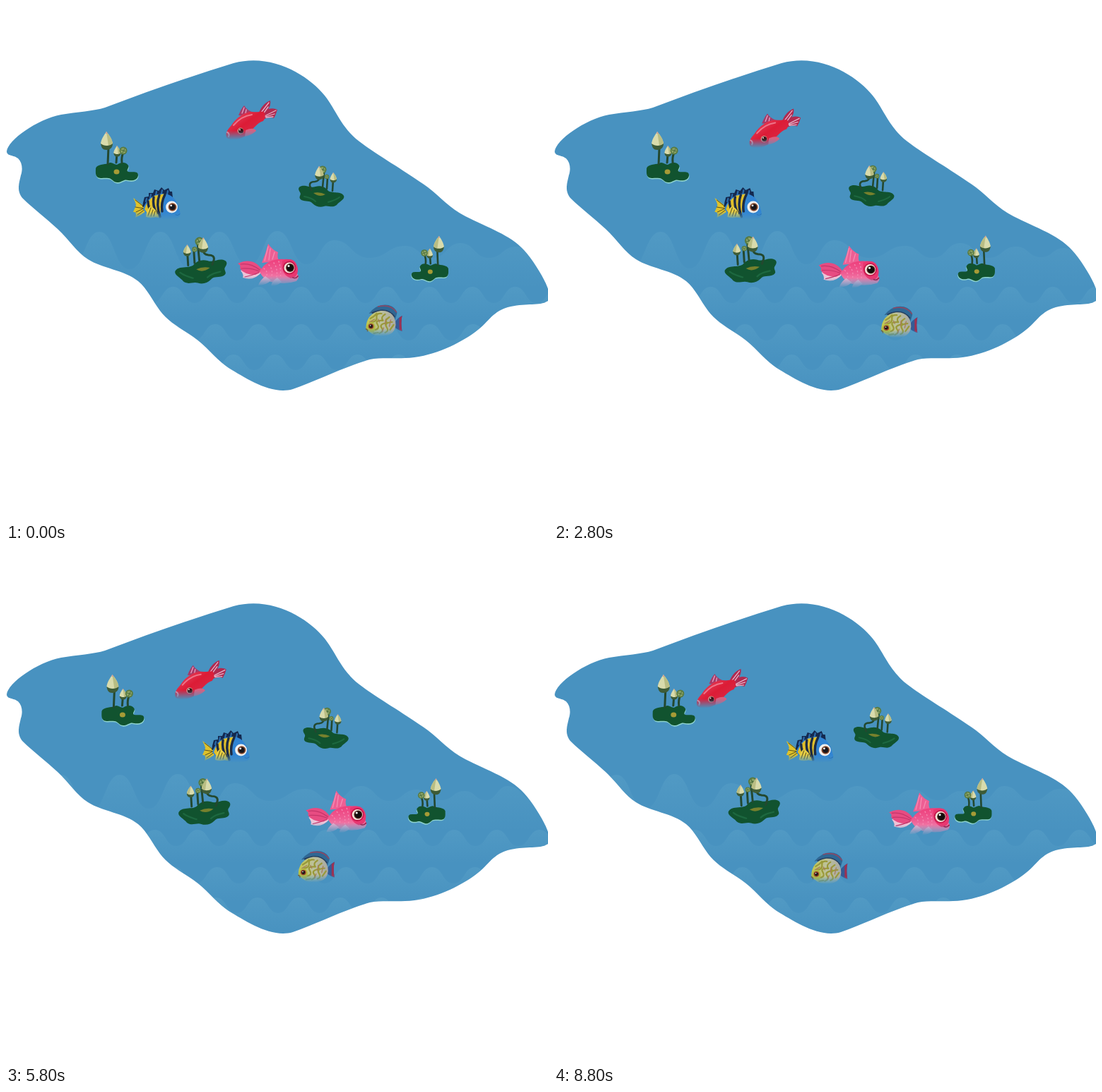
These frames come from a looping animation (767x730 px, 9 s). An HTML page:

```html
<!DOCTYPE html>
<html lang="en">
<head>
<meta charset="utf-8">
<title>Fish pond</title>
<style>
html, body { margin: 0; width: 100%; height: 100%; overflow: hidden; background: #fff; }
svg { display: block; width: 767px; height: 730px; }
.line { fill: none; stroke-linecap: round; stroke-linejoin: round; }
</style>
</head>
<body>
<svg viewBox="0 0 767 730">
<defs>
  <clipPath id="shore"><path id="pond" d="M1 206C3 190 43 161 78 154C100 150 125 149 140 144C200 121 260 100 322 81C376 66 428 98 451 127C467 147 474 172 500 192C523 210 567 235 597 257C614 270 628 287 650 298C683 315 713 324 733 346C746 360 763 388 767 401V418C755 426 735 420 710 427C685 435 684 449 660 465C635 482 600 498 565 499C550 500 530 498 515 501C480 511 440 531 406 543C376 552 340 528 315 513C297 501 284 482 265 469C247 457 229 447 218 432C207 417 200 401 187 390C167 374 136 372 116 359C100 349 90 332 73 316C57 301 37 286 24 273C14 262 19 250 21 240C24 231 23 222 17 216C11 211 1 213 1 206Z"/></clipPath>
  <linearGradient id="sink" x2="0" y2="1">
    <stop offset=".78" stop-color="#fff"/><stop offset="1" stop-color="#000"/>
  </linearGradient>
  <mask id="dip" maskContentUnits="objectBoundingBox"><rect x="-.1" y="-.1" width="1.2" height="1.1" fill="url(#sink)"/></mask>
  <linearGradient id="redSkin" x2="1" y2="1">
    <stop stop-color="#e8506e"/><stop offset=".45" stop-color="#dc1c36"/><stop offset="1" stop-color="#d9304f"/>
  </linearGradient>
  <linearGradient id="pinkSkin" x2="0" y2="1">
    <stop stop-color="#ee3f7c"/><stop offset=".5" stop-color="#ee5c93"/><stop offset="1" stop-color="#f396bb"/>
  </linearGradient>
  <linearGradient id="discusSkin">
    <stop stop-color="#c3c84a"/><stop offset=".5" stop-color="#bcc19c"/><stop offset="1" stop-color="#a9a9a4"/>
  </linearGradient>

  <g id="bud">
    <path d="M-8 17C-7 10-3 5 0 0C4 5 8 10 9 17C6 24-5 24-8 17Z" fill="#d9dbac"/>
    <path d="M0 0C4 5 8 10 9 17L3 20Z" fill="#b9bd83"/>
    <path d="M-1 3L0 0L2 3Z" fill="#d59a92"/>
    <path d="M-8 17C-3 21 4 21 9 17C9 23 5 26 0 26S-7 23-8 17Z" fill="#3d5b37"/>
  </g>
  <g id="pod">
    <circle r="5.5" fill="#56793f"/><circle r="3.8" fill="#8ba367"/>
    <path class="line" d="M-3-1L3 1M-1 3L2-3" stroke="#486b39"/>
  </g>

  <g id="tallLotus">
    <path id="tallPad" d="M0 52C2 46 12 47 18 45C22 42 26 47 30 47C36 43 43 43 46 48C48 51 42 55 46 57C52 58 60 55 60 62C59 69 52 70 46 69C40 67 38 71 32 72C25 73 23 66 18 66C12 65 8 67 3 65C-1 62 0 57 0 52Z" fill="#8ed3cf" transform="translate(.5 1.6)"/>
    <use href="#tallPad" transform="translate(-.5 -1.6)" style="filter:brightness(0)" opacity="0"/>
    <path d="M0 52C2 46 12 47 18 45C22 42 26 47 30 47C36 43 43 43 46 48C48 51 42 55 46 57C52 58 60 55 60 62C59 69 52 70 46 69C40 67 38 71 32 72C25 73 23 66 18 66C12 65 8 67 3 65C-1 62 0 57 0 52Z" fill="#11532f"/>
    <ellipse cx="29.5" cy="57" rx="4" ry="3.5" fill="#a69b36"/>
    <path class="line" d="M18 23L17 46M30 31L29 44M39 30Q36 36 37 44" stroke="#23482f" stroke-width="3"/>
    <use href="#bud" transform="translate(15 0)"/>
    <use href="#bud" transform="translate(30 20) scale(.6)"/>
    <use href="#pod" transform="translate(39 27)"/>
  </g>
  <g id="curlLotus">
    <path d="M2 30C10 26 16 33 24 30C32 28 38 31 42 36C48 40 60 36 64 43C66 48 58 51 54 56C48 61 42 56 36 58C30 60 24 58 20 54C16 49 10 52 4 49C-2 45 5 42 2 38C0 35-1 32 2 30Z" fill="#11532f"/>
    <path d="M8 44C16 46 20 47 24 51M42 52C48 50 53 49 58 45" class="line" stroke="#1d6840" stroke-width="2"/>
    <path d="M21 39Q30 46 38 41Q30 37 21 39Z" fill="#77812d"/>
    <path class="line" d="M29 16Q30 22 23 23Q15 23 16 29L18 35M36 10L34 31M41 17L40 33M49 20L48 36" stroke="#23482f" stroke-width="2.6"/>
    <use href="#pod" transform="translate(34 6)"/>
    <use href="#pod" transform="translate(40 16) scale(.6)"/>
    <use href="#bud" transform="translate(29 1) scale(.74)"/>
    <use href="#bud" transform="translate(49 10) scale(.56)"/>
  </g>

  <g id="redFish" mask="url(#dip)">
    <path d="M46 20C49 10 55 3 63 0Q64 7 60 12Q68 10 73 13Q71 20 68 25C60 22 54 27 46 30Z" fill="#b02a50"/>
    <path class="line" d="M50 17L61 3M52 20L60 9M55 22L71 14M56 23L69 19M57 24L67 23" stroke="#e5b2c8" stroke-width="1.3"/>
    <path d="M18 21Q22 11 26 7Q29 13 39 17L36 22Z" fill="#a63a68"/>
    <path class="line" d="M23 18L26 10M28 18L29 13" stroke="#e8a0c0" stroke-width="1.3"/>
    <path d="M1 52C-1 45 3 41 8 35C15 24 26 16 38 16C46 17 49 15 54 16Q58 22 53 29C44 32 39 40 31 48C22 55 6 59 1 52Z" fill="url(#redSkin)"/>
    <path class="line" d="M11 35Q22 22 37 20" stroke="#ee7489" stroke-width="2"/>
    <path d="M28 42Q40 37 43 43Q37 49 27 51Z" fill="#d9607f"/>
    <path class="line" d="M2 45Q6 47 4 51" stroke="#f08a9f" stroke-width="2"/>
    <circle cx="21" cy="43" r="4.4" fill="#d99a8e"/><circle cx="21.5" cy="43" r="3.5" fill="#391417"/>
    <circle cx="20" cy="41.5" r=".9" fill="#fff"/>
  </g>

  <g id="blueFish" mask="url(#dip)">
    <path d="M18 29Q7 20 0 15Q6 26 3 28L0 35Q6 34 3 43Q12 39 19 33Z" fill="#dfc22a"/>
    <path class="line" d="M3 18L17 29L4 35M6 39L17 31M3 28L15 30" stroke="#574d20"/>
    <path d="M13 28Q14 20 16 14L22 13L22 8L28 8L30 3L36 5L40 0L44 4L50 1L52 6L55 6L56 15Z" fill="#14294f"/>
    <path class="line" d="M18 20L19 16M24 15L25 10M32 11L33 6M40 9L41 4M48 10L49 5" stroke="#2c6cab" stroke-width="2.2"/>
    <path d="M14 31C18 16 30 9 42 9C54 9 62 17 65 31Q69 41 62 44Q39 48 22 42Z" fill="#3184d3"/>
    <path d="M16 31Q19 19 30 12L45 9Q37 24 39 43Q24 45 16 31Z" fill="#e0bf2b"/>
    <path class="line" d="M21 20Q21 29 27 37M29 14Q27 26 33 37M37 11Q32 24 38 42M45 10Q39 22 41 34" stroke="#1d2c45" stroke-width="3.4"/>
    <path d="M18 42Q19 31 24 27Q34 30 34 41Q27 45 18 42Z" fill="#e9d045"/>
    <path class="line" d="M21 40L25 29M25 41L28 32M29 41L31 34" stroke="#6d6228" stroke-width="1.2"/>
    <circle cx="54.5" cy="28" r="8.4" fill="#f3f1ee"/><circle cx="55.5" cy="28" r="5.8" fill="#86482b"/>
    <circle cx="55.5" cy="28" r="4" fill="#17151a"/><circle cx="53.7" cy="25.8" r="1.4" fill="#fff"/>
    <path class="line" d="M60 39Q63 41 66 38" stroke="#185fa9"/>
  </g>

  <g id="pinkFish" mask="url(#dip)">
    <path d="M34 41Q22 55 7 49Q9 45 4 39Q17 35 33 38Z" fill="#eec3d7"/>
    <path d="M35 39C25 22 10 24 0 29Q5 32 3 36Q9 45 25 45Z" fill="#e74c82"/>
    <path class="line" d="M4 30Q18 28 31 38M5 36Q20 35 30 40M10 48Q20 46 30 42" stroke="#c5356a" stroke-width="1.2"/>
    <path d="M34 28Q40 14 43 1Q49 10 57 13Q55 20 59 26Z" fill="#ee5f94"/>
    <path class="line" d="M38 25L43 5M44 24L46 8M49 23L52 13" stroke="#f58db4" stroke-width="1.3"/>
    <path d="M31 41C38 26 52 22 66 23C79 21 87 33 84 43Q88 49 83 54Q69 59 53 56Q39 56 31 41Z" fill="url(#pinkSkin)"/>
    <path class="line" d="M37 36Q44 42 40 47M44 31Q51 38 47 50M51 28Q58 38 54 52M58 26Q62 38 60 52" stroke="#f48ab2" stroke-width="1.4" stroke-dasharray="1 4"/>
    <path d="M39 47Q31 53 29 60Q40 60 47 53ZM56 49Q48 54 47 61Q56 61 62 55Z" fill="#f0aecb"/>
    <path d="M63 25Q82 18 85 37Q85 49 75 50Q60 44 63 25Z" fill="#e93670"/>
    <circle cx="73" cy="35" r="9.4" fill="#c6184c"/><circle cx="73" cy="35" r="7.6" fill="#f2e2d9"/>
    <circle cx="74" cy="35" r="5.9" fill="#4a241c"/><circle cx="74" cy="35" r="4.6" fill="#110c0c"/>
    <circle cx="72" cy="32.5" r="1.5" fill="#fff"/>
    <path class="line" d="M78 49Q82 51 85 47" stroke="#a91844" stroke-width="1.8"/>
  </g>

  <g id="discus" mask="url(#dip)">
    <path d="M41 26Q47 18 52 16Q50 26 52 38Q47 37 41 32Z" fill="#345b96"/>
    <path d="M48 19L52 16Q50 26 52 38L48 36Z" fill="#9c3152"/>
    <path d="M5 13Q17-2 33 1Q43 4 45 12L41 26L24 10Z" fill="#2f6794"/>
    <path class="line" d="M18 3Q36-1 44 11" stroke="#8f4763" stroke-width="1.5"/>
    <path class="line" d="M10 12Q30 3 41 17" stroke="#263e5e" stroke-width="2"/>
    <path d="M1 33C1 18 12 9 24 9C36 9 43 17 43 29C42 40 34 45 22 45Q8 45 1 33Z" fill="url(#discusSkin)"/>
    <path class="line" d="M7 20Q13 17 16 13M9 25Q17 24 16 18T23 13M14 36Q21 34 17 28T25 23Q21 18 28 14M20 41Q27 38 23 33T31 26Q26 23 34 18M28 40Q34 38 30 32T38 25M35 36L40 29M12 41L18 40" stroke="#9a9938" stroke-width="2.2"/>
    <path class="line" d="M6 25L13 21M20 25L18 21M28 28L29 21M34 31L36 22M24 39L26 33" stroke="#a67b5c" stroke-width="1.3"/>
    <path d="M1 33Q3 25 10 25Q17 30 12 40Q4 39 1 33Z" fill="#b4ba40"/>
    <circle cx="8" cy="31" r="3.8" fill="#96402b"/><circle cx="8" cy="31" r="2.4" fill="#1a1715"/>
    <circle cx="7.2" cy="30" r=".8" fill="#fff"/>
    <path class="line" d="M1 35Q4 36 3 38" stroke="#775f29" stroke-width="1.5"/>
  </g>
</defs>
<use href="#pond" fill="#4892c0"/>
<g id="waves" clip-path="url(#shore)"></g>
<g id="life"></g>
</svg>
<script>
const STEP = 200, LOOP = 9000;
const movers = [];
const waves = document.getElementById('waves');
const life = document.getElementById('life');

function addMover(parent, markup, vx, vy) {
  parent.insertAdjacentHTML('beforeend', `<g>${markup}</g>`);
  movers.push({ node: parent.lastElementChild, vx, vy });
}

// Smooth line through alternating crests and troughs, fading downwards.
function addWave(points, top, bottom, speed) {
  let [px, py] = points[0];
  let d = `M${px} ${bottom}V${py}`;
  for (const [x, y] of points.slice(1)) {
    const mid = (px + x) / 2;
    d += `C${mid} ${py} ${mid} ${y} ${x} ${y}`;
    [px, py] = [x, y];
  }
  const id = 'fade' + top;
  addMover(waves, `<linearGradient id="${id}" gradientUnits="userSpaceOnUse" x1="0" x2="0" y1="${top}" y2="${bottom}">
    <stop stop-color="#90d0e0" stop-opacity=".12"/><stop offset="1" stop-color="#90d0e0" stop-opacity="0"/></linearGradient>
    <path fill="url(#${id})" d="${d}V${bottom}Z"/>`, speed, 0);
}

function ripples(crest, spacing, top, trough) {
  const points = [];
  for (let x = crest - 10 * spacing; x < 1150; x += spacing)
    points.push([x, top], [x + spacing / 2, trough]);
  return points;
}

const swell = [[48, 320], [90, 373], [132, 320], [175, 373], [219, 320], [260, 372],
  [302, 320], [343, 368], [384, 319], [425, 366], [464, 332], [514, 357], [565, 340], [604, 357],
  [643, 336], [683, 357], [722, 341], [757, 356], [790, 343], [820, 356], [851, 336], [891, 357], [930, 340], [1000, 357]];

addWave(swell, 319, 400, -24.3);
addWave(ripples(297, 60.5, 398, 421), 398, 445, 16.4);
addWave(ripples(357, 60.8, 451, 474), 451, 500, -31);
addWave(ripples(322, 58.5, 494, 516), 494, 545, 26);

const addLife = (id, x, y, vx, vy, scale = '1') =>
  addMover(life, `<use href="#${id}" transform="translate(${x} ${y}) scale(${scale})"/>`, vx, vy);

addLife('tallLotus', 127, 178, 1.45, 0);
addLife('curlLotus', 414, 226, 1.1, -.3);
addLife('curlLotus', 312.5, 327, .85, -.45, '-1.14 1.13');
addLife('tallLotus', 626, 326, -.75, -.15, '-.87 .89');
addLife('redFish', 311, 134, -12.45, 4.08);
addLife('blueFish', 180, 257, 16.9, 0);
addLife('pinkFish', 328, 336, 16.6, .95);
addLife('discus', 508.5, 423, -16.5, .78);

function draw(now) {
  const seconds = Math.floor(now % LOOP / STEP) * STEP / 1000;
  for (const { node, vx, vy } of movers)
    node.setAttribute('transform', `translate(${vx * seconds} ${vy * seconds})`);
  requestAnimationFrame(draw);
}
draw(performance.now());
</script>
</body>
</html>
```
